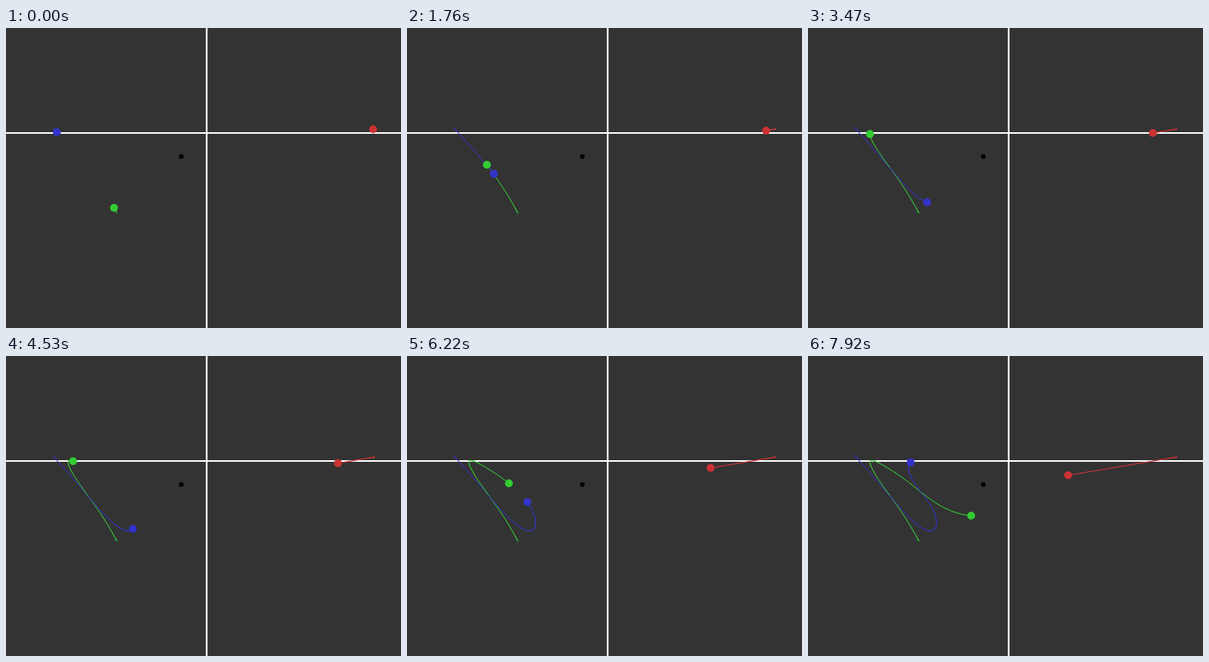
Recreate the animation shown at these times as an HTML page with a canvas. Size 500 by 380 pixels, loop 8 s.

```html
<!DOCTYPE html>
<html lang="en">
<head>
<meta charset="utf-8">
<title>Three bodies</title>
<style>
  html, body { margin: 0; height: 100%; overflow: hidden; background: #333; }
  canvas { display: block; }
</style>
</head>
<body>
<canvas id="stage" width="500" height="380"></canvas>
<script>
const ctx = document.getElementById('stage').getContext('2d');
const LOOP = 8000, STEP = 1000 / 13, LAST_STEP = 103;
const RELEASE = -1190;
const CENTER = { x: 221.9, y: 162.7 };
const COLORS = ['#cc3333', '#33cc33', '#3333cc'];

// Each swing of the green-blue pair: its end, zero crossing, quarter period and reach.
const SWINGS = [
  { until: 1690, cross: 1690, quarter: -2880, reach: 67.5 },
  { until: 6430, cross: 1690, quarter: 2370, reach: -58.7 },
  { until: Infinity, cross: 6430, quarter: 2550, reach: 57.5 }
];

// A sine sharpened toward its zero, like a fall through a soft center of gravity.
function pairReach(t) {
  const { cross, quarter, reach } = SWINGS.find(swing => t <= swing.until);
  const s = Math.sin((t - cross) / quarter * Math.PI / 2);
  return reach * s * (1.03 / (s * s + 0.03)) ** 0.25;
}

// Equal masses: the green-blue midpoint balances red around the center.
function positions(t) {
  const sec = (t - RELEASE) / 1000;
  const fallen = sec ** 2 * (1.37 + 4.12e-5 * sec ** 4);
  const x = 466.6 - fallen, y = 128 + 0.168 * fallen;
  const midX = (3 * CENTER.x - x) / 2, midY = (3 * CENTER.y - y) / 2;
  const angle = (53.1 - 0.14 * sec ** 2) * Math.PI / 180;
  const reach = pairReach(t);
  const dx = reach * Math.cos(angle), dy = reach * Math.sin(angle);
  return [[x, y], [midX + dx, midY + dy], [midX - dx, midY - dy]];
}

function line(from, to, color, width) {
  ctx.strokeStyle = color;
  ctx.lineWidth = width;
  ctx.beginPath();
  ctx.moveTo(...from);
  ctx.lineTo(...to);
  ctx.stroke();
}

function disc([x, y], radius, color) {
  ctx.fillStyle = color;
  ctx.beginPath();
  ctx.arc(x, y, radius, 0, 2 * Math.PI);
  ctx.fill();
}

function draw(t) {
  ctx.fillStyle = '#333';
  ctx.fillRect(0, 0, 500, 380);
  ctx.lineCap = 'round';
  line([254, 0], [254, 380], '#fff', 2.2);
  line([0, 133], [500, 133], '#fff', 1.8);
  disc([CENTER.x, CENTER.y], 3, '#000');

  // Separate round-capped strokes overlap, so slow stretches look bolder.
  let previous = positions(RELEASE);
  for (let at = RELEASE + STEP; at < t + STEP; at += STEP) {
    const current = positions(Math.min(at, t));
    COLORS.forEach((color, i) => line(previous[i], current[i], color, 1));
    previous = current;
  }
  positions(t).forEach((body, i) => disc(body, 5, COLORS[i]));
}

function tick() {
  const t = performance.now() % LOOP;
  draw(Math.min(Math.floor((t + 16) / STEP), LAST_STEP) * STEP);
  requestAnimationFrame(tick);
}
tick();
</script>
</body>
</html>
```
